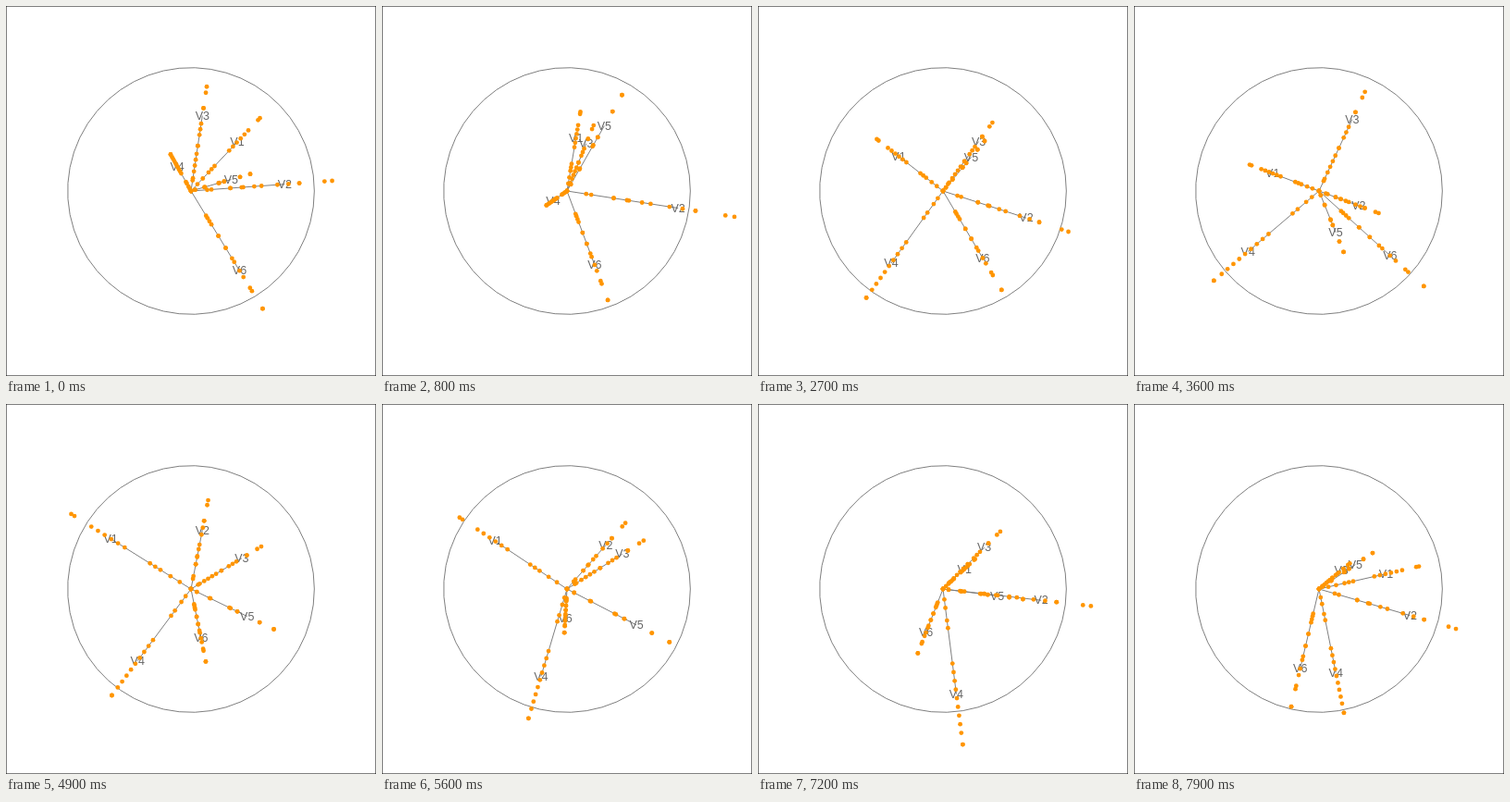
An HTML page that plays this animation: 400 px wide and 400 px high, repeating every 8 s.

```html
<!DOCTYPE html>
<html lang="en">
<head>
<meta charset="utf-8">
<title>Projection tour</title>
<style>
  html, body { margin: 0; width: 100%; height: 100%; overflow: hidden; background: #fff; }
  svg { display: block; width: 100vw; height: 100vh; }
  .line { fill: none; stroke: #7f7f7f; stroke-width: 1; }
  text { font: 12.5px "Liberation Sans", Arial, sans-serif; fill: #666; text-anchor: middle; }
  circle { fill: #ff9500; }
</style>
</head>
<body>
<svg id="stage" viewBox="0 0 400 400"></svg>
<script>
const CENTER = 200, RADIUS = 400 / 3, FRAME_MS = 100, FRAMES = 80, SPACING = .08;
const stage = document.getElementById("stage");

// Where the observations of each variable lie, in multiples of its axis;
// a range is filled evenly, about one dot per SPACING.
const clusters = [
  [[.14, .255], [.38, .51], [.825, 1.24], [1.45, 1.49]],
  [[.173, .218], [.42], [.54, .557], [.675, .752], [.922, 1.04], [1.156], [1.425, 1.506]],
  [[.14, .17], [.26, .494], [.6], [.745, .895], [1.1], [1.305, 1.385]],
  [[.1, .18], [.3, .372], [.71, 1.37], [1.48]],
  [[.103], [.332, .346], [.685, .705], [.825], [1.222], [1.475]],
  [[.31, .34], [.38, .42], [.564], [.714], [.845, .89], [1, 1.08], [1.215, 1.255], [1.475]]
];

function fill([from, to = from]) {
  const gaps = Math.max(1, Math.round((to - from) / SPACING));
  return Array.from({ length: gaps + 1 }, (_, i) => from + (to - from) * i / gaps);
}
const values = clusters.map(ranges => [0, ...ranges.flatMap(fill)]);

const dot = (a, b) => a.reduce((sum, v, i) => sum + v * b[i], 0);
const mix = (a, p, b, q) => a.map((v, i) => p * v + q * b[i]);

// A pose holds the x row and the y row of the axis ends. The rows are orthogonal and
// equally long, so the third axis is a complex root fixed by the other five.
function pose(...ends) {
  const xs = ends.map(e => e[0]), ys = ends.map(e => e[1]);
  const re = dot(ys, ys) - dot(xs, xs), im = -2 * dot(xs, ys);
  const x = Math.sqrt((Math.hypot(re, im) + re) / 2);
  xs.splice(2, 0, x);
  ys.splice(2, 0, im / (2 * x));
  return [xs, ys];
}

const first = pose([50, -52.9], [101.3, -7.3], [-14.9, -26.7], [43.4, -12.4], [52.5, 86.2]);
// travel beyond steps carries a leg past its key pose before the next one begins
const legs = [
  { start: 0, steps: 17, travel: 17, to: pose([-32.2, -38.6], [118.9, 29.2], [-13.5, 48.3], [35.9, -107.8], [-7.1, 36.6]) },
  { start: 17, steps: 10, travel: 10, to: pose([-48, -37.6], [90, 29.2], [-56, 78], [30.5, -36.6], [42.9, 72.5]) },
  { start: 27, steps: 9, travel: 9, to: pose([-50.3, -19.1], [42.8, 15.9], [-76.8, 65.5], [18, 44.7], [76.8, 69.8]) },
  { start: 36, steps: 13, travel: 14.3, to: pose([-86.9, -54.4], [12.3, -63.7], [-57.8, 77.7], [60.7, 29.5], [10.8, 53.2]) },
  { start: 51, steps: 13, travel: 14, to: pose([-36.9, -26.5], [89.6, -11.3], [4.7, 109.8], [69.8, 40.7], [-12.2, 1]) },
  { start: 65, steps: 14, travel: 14, to: pose([72.5, -16.4], [98.3, 28.6], [18.2, 90.4], [39.3, -26.4], [-20.3, 86.2]) }
];

function rotate([x, y], angle) {
  const c = Math.cos(angle), s = Math.sin(angle);
  return [mix(x, c, y, s), mix(x, -s, y, c)];
}

function slerp(a, b, t) {
  const angle = Math.acos(dot(a, b) / Math.sqrt(dot(a, a) * dot(b, b)));
  return mix(a, Math.sin((1 - t) * angle) / Math.sin(angle), b, Math.sin(t * angle) / Math.sin(angle));
}

// Geodesic between two planes: turn to the principal directions, slerp each, turn back.
function geodesic(from, to, t) {
  const angle = Math.atan2(dot(from[0], to[1]) + dot(from[1], to[0]),
                           dot(from[0], to[0]) - dot(from[1], to[1])) / 2;
  const a = rotate(from, angle), b = rotate(to, angle);
  return rotate([slerp(a[0], b[0], t), slerp(a[1], b[1], t)], -angle);
}

let reached = first;
for (const leg of legs) {
  leg.from = reached;
  reached = geodesic(leg.from, leg.to, leg.travel / leg.steps);
}

function poseAt(frame) {
  const leg = legs.filter(l => l.start <= frame).pop();
  return geodesic(leg.from, leg.to, Math.min(frame - leg.start, leg.travel) / leg.steps);
}

function set(el, attrs) {
  for (const key in attrs) el.setAttribute(key, attrs[key]);
}

function add(name, attrs) {
  const el = document.createElementNS("http://www.w3.org/2000/svg", name);
  set(el, attrs);
  return stage.appendChild(el);
}

add("rect", { width: 400, height: 400, fill: "none", stroke: "#000" });
const rim = Array.from({ length: 49 }, (_, i) => {
  const a = i / 49 * 2 * Math.PI;
  return [CENTER + RADIUS * Math.cos(a), CENTER - RADIUS * Math.sin(a)];
});
add("polygon", { points: rim.join(" "), class: "line" });

const axes = values.map(() => add("line", { x1: CENTER, y1: CENTER, class: "line" }));
const labels = values.map((_, i) => {
  const label = add("text", {});
  label.textContent = "V" + (i + 1);
  return label;
});
const dots = values.map(list => list.map(() => add("circle", { r: 2.4 })));

function draw(frame) {
  const [xs, ys] = poseAt(frame);
  values.forEach((list, i) => {
    const at = k => [CENTER + k * xs[i], CENTER + k * ys[i]];
    const [x, y] = at(1);
    set(axes[i], { x2: x, y2: y });
    set(labels[i], { x, y: y + 4.2 });
    list.forEach((value, j) => {
      const [cx, cy] = at(value);
      set(dots[i][j], { cx, cy });
    });
  });
}

const begin = performance.now();
function tick() {
  draw(Math.floor((performance.now() - begin) / FRAME_MS) % FRAMES);
  requestAnimationFrame(tick);
}
tick();
</script>
</body>
</html>
```
